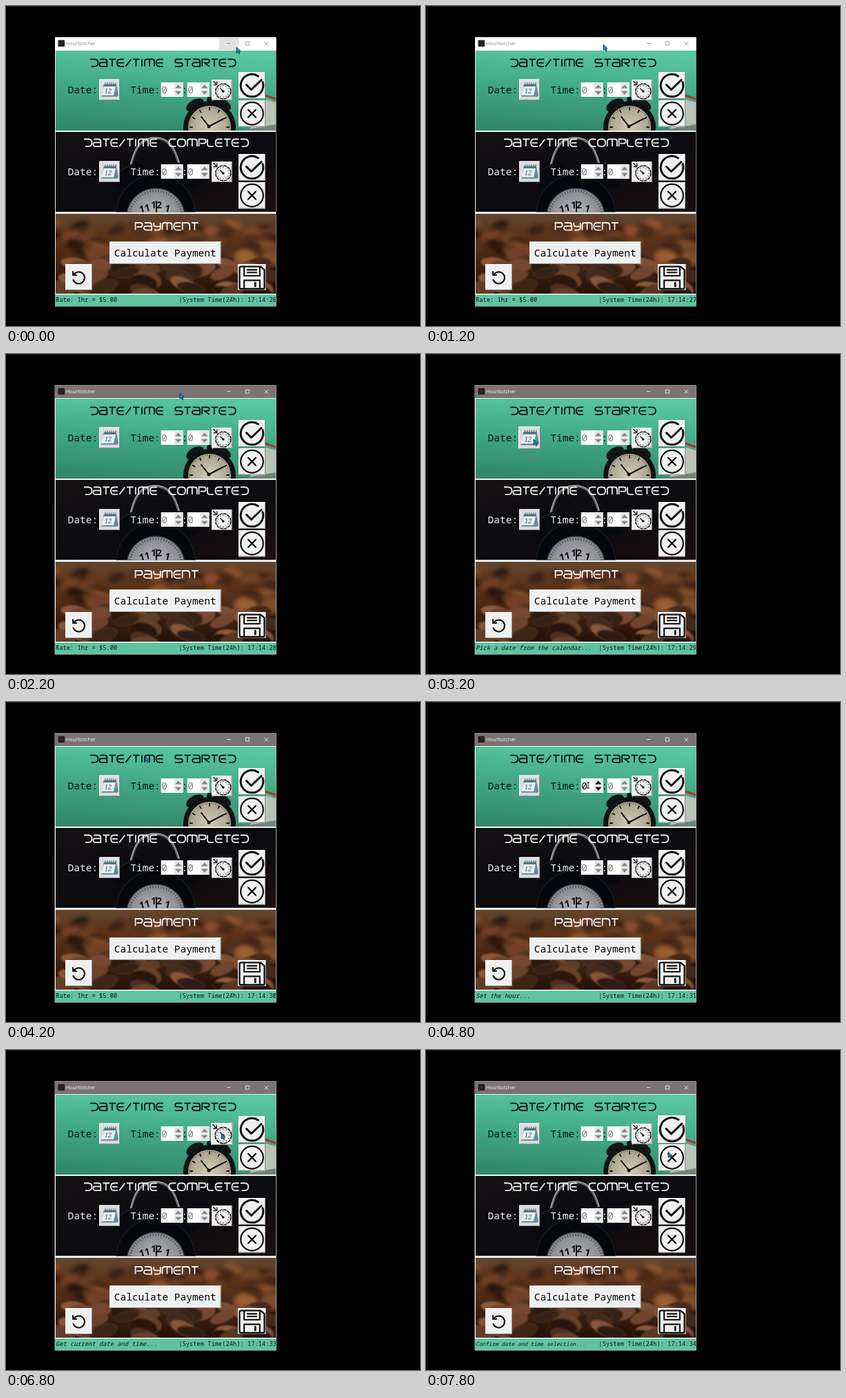
These frames come from a looping animation (600x465 px, 8000 ms). An HTML page:

```html
<!DOCTYPE html>
<html lang="en">
<head>
<meta charset="utf-8">
<title>HourNotcher</title>
<style>
html, body { margin: 0; width: 100%; height: 100%; overflow: hidden; background: #000; }
svg { display: block; }
text { white-space: pre; }
.mono { font: 14.5px "Noto Sans Mono", "DejaVu Sans Mono", monospace; }
.small { font: 500 8.75px "Noto Sans Mono", "DejaVu Sans Mono", monospace; }
.ui { font: 7px "Open Sans", sans-serif; }
.face { font-family: "Noto Serif", serif; text-anchor: middle; }
.dial { font: 700 14px "Open Sans", sans-serif; text-anchor: middle; }
.line { fill: none; stroke: #111; stroke-linecap: round; stroke-linejoin: round; }
</style>
</head>
<body>
<svg id="stage" width="600" height="465" viewBox="0 0 600 465"></svg>
<script>
const STEP = 200, LOOP = 8000;

// Stroke letters of the wide display face: [advance, path] in a 12-unit cap height
const GLYPHS = {
  D: [14, 'M0 0H7Q13 0 13 6T7 12H2'],
  A: [15, 'M1 0H9Q12.5 0 12.5 4V12H5Q0 12 0 8.7T4 5.5H12'],
  T: [12, 'M0 0H11M5 0V12'],
  E: [13, 'M11.5 0H5Q0 0 0 6T5 12H11.5M2 6H11'],
  '/': [11, 'M0 12L9 0'],
  I: [5, 'M1.5 0V12'],
  M: [18, 'M0 12V4Q0 0 4 0H12Q16 0 16 4V12M8 0V12'],
  ' ': [16, ''],
  S: [14, 'M11.5 0H3Q0 0 0 3T3 6H9Q12 6 12 9T9 12H0'],
  R: [14, 'M0 12V0H9Q12 0 12 3T9 6H4L12 12'],
  C: [13, 'M11.5 0H5Q0 0 0 6T5 12H11.5'],
  O: [15, 'M5 0H8Q13 0 13 6T8 12H5Q0 12 0 6T5 0Z'],
  P: [13, 'M0 12V0H8Q11.5 0 11.5 3.5T8 7H2'],
  L: [12, 'M0 0V8Q0 12 4 12H10'],
  Y: [13, 'M0 0V3Q0 6 4 6H11M11 0V8Q11 12 7 12H1'],
  N: [14, 'M0 12V0H7Q12 0 12 5V12']
};

function heading(label, x, y, color) {
  let at = 0;
  const body = [...label].map(c => {
    const [adv, d] = GLYPHS[c], part = `<path transform="translate(${at})" d="${d}"/>`;
    at += adv + 1.1;
    return part;
  }).join('');
  return `<g role="img" aria-label="${label}" transform="translate(${x} ${y}) scale(.88)"
    fill="none" stroke="${color}" stroke-width="2">${body}</g>`;
}

const rect = (x, y, w, h, fill, more = '') =>
  `<rect x="${x}" y="${y}" width="${w}" height="${h}" fill="${fill}" ${more}/>`;
const path = (d, width = 1, more = '') =>
  `<path class="line" d="${d}" stroke-width="${width}" ${more}/>`;
const circle = (x, y, r, fill, more = '') =>
  `<circle cx="${x}" cy="${y}" r="${r}" fill="${fill}" ${more}/>`;
const ellipse = (x, y, rx, ry, fill, turn = 0, more = '') =>
  `<ellipse cx="${x}" cy="${y}" rx="${rx}" ry="${ry}" fill="${fill}" transform="rotate(${turn} ${x} ${y})" ${more}/>`;
const text = (x, y, str, cls, fill, more = '') =>
  `<text x="${x}" y="${y}" class="${cls}" fill="${fill}" ${more}>${str}</text>`;
const panel = (y, h, body) =>
  `<svg x="72" y="${y}" width="319" height="${h}" viewBox="72 ${y} 319 ${h}">${body}</svg>`;

// Raised button around its centre; hovering grows it by 2px
function button(x, y, w, h, icon, id = '', fill = '#f0f0f0') {
  const place = `translate(${x + w / 2} ${y + h / 2})`, r = w / 2 - .5, b = h / 2 - .5;
  return `<g transform="${place}"><g ${id && `id="${id}" data-grow="${1 + 2 / w}"`}>` +
    rect(-w / 2, -h / 2, w, h, fill) +
    path(`M${-r} ${b}V${-b}H${r}`, 1, 'style="stroke:#fff"') +
    path(`M${-r} ${b}H${r}V${-b}`, 1, 'style="stroke:#8c8c8c"') + icon + '</g></g>';
}

function ticks(n, r1, r2, width) {
  let d = '';
  for (let i = 0; i < n; i++) {
    const a = i / n * 2 * Math.PI, c = Math.cos(a), s = Math.sin(a);
    d += `M${c * r1} ${s * r1}L${c * r2} ${s * r2}`;
  }
  return path(d, width);
}

const ICONS = {
  calendar:
    '<path d="M-8-7H10L13 8L11 10H-12Z" fill="#5d8f9b"/><path d="M-8-5H9L6 8H-12Z" fill="#e9f0f2"/>' +
    '<path d="M-8-8H10L9-5H-9Z" fill="#4b7883"/>' +
    path('M-6-10V-7M-3-10V-7M0-10V-7M3-10V-7M6-10V-7M9-10V-7', 1, 'style="stroke:#3c5e68"') +
    text(-2, 5.5, '12', 'face', '#4a5a60', 'font-size="9.5" font-style="italic"'),
  watch:
    '<g transform="translate(2 2)">' + circle(0, 0, 11, 'none', 'stroke="#111" stroke-width="1.5" stroke-dasharray="4.8 .96"') +
    ticks(12, 8, 9.2, .8) + circle(0, 0, 1.8, '#111') + path('M0 0L-4-4', 1.3) + '</g>' +
    path('M-12-12.5L-7-7.5M-7-12V-7.5H-11.5', 1.3),
  check: path('M15.5-5A16.3 16.3 0 1 1 9-13.6M-8-1L-1 6L13.5-8', 3),
  cross: circle(0, 0, 16.3, 'none', 'stroke="#111" stroke-width="2.2"') + path('M-5.5-5.5L5.5 5.5M5.5-5.5L-5.5 5.5', 2.3),
  reset: path('M-7-4A8.5 8.5 0 1 1-8 4', 2.1) + path('M-8.5-8V-3H-3.5', 2.1),
  save: '<g transform="translate(0 .8) scale(.95)">' +
    path('M-16-17H13L19-12V15Q19 17 17 17H-17Q-19 17-19 15V-15Q-19-17-16-17Z', 2.5) +
    path('M-12-16V-3H12V-16M-12 16V4H12V16M-7-12H7M-7-8H7', 2.2) + path('M5 8V13', 3) + '</g>'
};

function spin(x, y, id = '') {
  return `<g ${id && `id="${id}"`} fill="#858585">` + rect(x, y, 32, 21, '#fff') +
    rect(x + 19, y + 1, 12, 9.3, '#e6e6e6') + rect(x + 19, y + 10.8, 12, 9.3, '#e6e6e6') +
    `<text x="${x + .6}" y="${y + 15.7}" class="mono">0</text>
     <path d="M${x + 20.3} ${y + 8.5}h9.4l-4.7-5zM${x + 20.3} ${y + 12.8}h9.4l-4.7 5z"/></g>`;
}

function controls(y, color, ids = []) {
  return text(89.6, y + 62, 'Date:', 'mono', color) + text(180.3, y + 62, 'Time:', 'mono', color) +
    text(254.6, y + 62, ':', 'mono', color) +
    spin(224.7, y + 46, ids[1]) + spin(262.7, y + 46, ids[2]) +
    button(135, y + 41.5, 30, 30.5, ICONS.calendar, ids[0], '#dcdcdc') +
    button(298, y + 42, 29.5, 30, ICONS.watch, ids[3]) +
    button(337, y + 31, 39, 39, ICONS.check, ids[4]) +
    button(337, y + 72, 39, 38.5, ICONS.cross);
}

const greenScene = rect(72, 65, 319, 116, 'url(#green)') +
  '<path d="M352 181L377 136L391 140V181Z" fill="#b9c1b8"/><path d="M340 181L391 172V181Z" fill="#6f8478"/>' +
  path('M372 128.5L392 135.5', 3, 'style="stroke:#b5312b"') +
  ellipse(274, 144, 14, 8, '#131517', -30) + ellipse(313, 143, 14, 8, '#131517', 28) +
  circle(295, 136, 4, '#131517') + circle(295, 176, 38, '#0f1213') +
  circle(295, 176, 31, 'url(#cream)') +
  `<g transform="translate(295 176)">${ticks(12, 25, 28, 1.8)}${ticks(60, 28.5, 29.5, .5)}</g>` +
  path('M294 175L283 161M294 175L315 164', 2) + circle(294, 175, 2.5, '#111');

const darkScene = rect(72, 183, 319, 116, 'url(#dark)') +
  path('M180 236C186 206 196 192 216 192S244 206 251 230', 3.4, 'style="stroke:#6d6c70"') +
  path('M180 233C186 204 196 191 216 191S244 204 251 227', 1, 'style="stroke:#b9b8ba"') +
  ellipse(179, 247, 27, 15, '#07090e', -28) + ellipse(257, 246, 27, 15, '#07090e', 28) +
  path('M160 246Q171 232 187 231M247 231Q265 234 275 246', 1.2, 'style="stroke:#1f2731"') +
  circle(217, 302, 57, '#05070b', 'stroke="#141b25" stroke-width="1.5"') +
  circle(217, 307, 42, 'url(#steel)', 'stroke="#3b4049" stroke-width="1.5"') +
  `<g transform="translate(217 307)">${ticks(60, 37, 39.5, .7)}</g>` +
  text(218, 294, '12', 'dial', '#14161b') +
  text(202, 299, '11', 'dial', '#14161b', 'transform="rotate(-14 202 299)"') +
  text(233, 299, '1', 'dial', '#14161b', 'transform="rotate(14 233 299)"') +
  path('M218 300V284', 2);

// Out-of-focus blobs behind, then sharper coins towards the bottom
function coinScene() {
  let seed = 17, out = rect(72, 302, 319, 116, 'url(#brown)');
  const rnd = () => (seed = seed * 16807 % 2147483647) / 2147483647;
  for (let i = 0; i < 105; i++) {
    const k = i / 105, far = k < .5, x = 66 + rnd() * 330, y = 312 + k * 104 + rnd() * 8, r = 13 + k * 9;
    const tone = `${18 + rnd() * 9} ${far ? 50 : 42}%`, light = 8 + rnd() * 32;
    out += ellipse(x, y, r, r * (.35 + rnd() * .25), `hsl(${tone} ${light}%)`, rnd() * 50 - 25,
      `stroke="hsl(${tone} ${light * .6 + 14}%)" filter="url(#${far ? 'far' : 'near'})"`);
  }
  return out;
}

const stop = (at, color) => `<stop offset="${at}" stop-color="${color}"/>`;
const stage = document.getElementById('stage');
stage.innerHTML = `<defs>
  <linearGradient id="green" x1=".6" x2=".4" y2="1">${stop(0, '#59c7a2') + stop(.45, '#43ab89') + stop(1, '#31896a')}</linearGradient>
  <radialGradient id="cream">${stop(0, '#d2cab4') + stop(1, '#a8a18c')}</radialGradient>
  <radialGradient id="steel">${stop(0, '#c0c0c4') + stop(1, '#84858c')}</radialGradient>
  <linearGradient id="dark" y2="1">${stop(0, '#141113') + stop(.5, '#0c0b0f') + stop(1, '#180f0f')}</linearGradient>
  <linearGradient id="brown" x2="0" y2="1">${stop(0, '#62462f') + stop(.3, '#5d3319') + stop(1, '#231108')}</linearGradient>
  <filter id="far" x="-60%" y="-120%" width="220%" height="340%"><feGaussianBlur stdDeviation="3.4"/></filter>
  <filter id="near"><feGaussianBlur stdDeviation=".8"/></filter>
  </defs>` +
  rect(0, 0, 600, 1, '#202020') +
  rect(70, 45, 322, 391.5, '#5c5757', 'id="frame"') + rect(71, 45.5, 320.5, 391, '#f0f0f0') +
  rect(71, 45.5, 320.5, 18.5, '#fff', 'id="bar"') +
  rect(309, 45.5, 28, 18.5, '#e0e0e0', 'id="minHover"') +
  rect(75.5, 49.5, 9.5, 9.5, '#2b2020') + text(87, 57, 'HourNotcher', 'ui', '#888', 'id="caption"') +
  '<path id="winButtons" fill="none" stroke-width=".8" d="M320 54.5h5.5M347.3 52h5v5h-5zM374.5 52l5.5 5.5m0-5.5l-5.5 5.5"/>' +
  panel(65, 116, greenScene) + panel(183, 116.5, darkScene) + panel(302, 116, coinScene()) +
  heading('DATE/TIME STARTED', 122, 77.3, '#06110d') +
  controls(65, '#07120f', ['calendar', 'hour', 'minute', 'watch', 'check']) +
  heading('DATE/TIME COMPLETED', 113, 193.5, '#eee') +
  controls(184, '#f0f0f0') +
  heading('PAYMENT', 187.5, 315, '#f0f0f0') +
  button(150, 342.5, 161.5, 32.5, text(0, 5.3, 'Calculate Payment', 'mono', '#000', 'text-anchor="middle"')) +
  button(86, 375, 39, 38, ICONS.reset) + button(336, 375, 41, 38, ICONS.save) +
  rect(71, 419.5, 320.5, 16.5, '#5fc3a2') +
  panel(419.5, 16.5, text(72, 430.2, '', 'small', '#06130f', 'id="status"') +
    text(250.3, 430.2, '', 'small', '#06130f', 'id="clock"')) +
  `<g id="pointer"><path id="arrow" d="M0 0V8.4L2 6.6L3.5 9.6L5 8.9L3.7 6L6 5.7Z" fill="#1d86c4" stroke="#0b3550" stroke-width=".8"/>
   <path id="beam" d="M-2-4H2M0-4V4M-2 4H2" fill="none" stroke="#111"/></g>`;

const $ = id => document.getElementById(id);

// Pointer stops: time, x, y
const TRACK = [
  [0, 334, 60], [200, 274, 54], [600, 274, 54], [1200, 257, 56], [1400, 257, 56],
  [1600, 253, 57], [2200, 252, 57], [2600, 205, 80], [3000, 161, 119], [3200, 156, 124],
  [3400, 156, 124], [4000, 186, 64], [4600, 233, 108], [4800, 235, 121], [5000, 235, 121],
  [5400, 269, 122], [5800, 273, 122], [6200, 304, 131], [6400, 308, 122], [6600, 308, 122],
  [6800, 312, 121], [7200, 353, 117], [7800, 351, 148]
];

// Hovered control with its hint: start, end, id, hint
const HOVERS = [
  [3000, 3600, 'calendar', 'Pick a date from the calendar...'],
  [4800, 5400, 'hour', 'Set the hour...'],
  [5400, 6000, 'minute', 'Set the minute...'],
  [6200, 7000, 'watch', 'Get current date and time...'],
  [7200, LOOP, 'check', 'Confirm date and time selection...']
];

function pointerAt(t) {
  const i = TRACK.findIndex(p => p[0] > t);
  if (i < 0) return TRACK[TRACK.length - 1].slice(1);
  const [t0, x0, y0] = TRACK[i - 1], [t1, x1, y1] = TRACK[i], k = (t - t0) / (t1 - t0);
  return [x0 + (x1 - x0) * k, y0 + (y1 - y0) * k];
}

const show = (id, on) => $(id).setAttribute('visibility', on ? 'visible' : 'hidden');

function draw(t) {
  const active = t >= 1800;
  $('bar').setAttribute('fill', active ? '#7b7373' : '#fff');
  $('caption').setAttribute('fill', active ? '#fff' : '#888');
  $('winButtons').setAttribute('stroke', active ? '#fff' : '#888');
  show('frame', active);
  show('minHover', t < 200);

  let hint = '', over = '';
  for (const [start, end, id, label] of HOVERS) {
    const on = t >= start && t < end, el = $(id), grow = el.dataset.grow;
    if (on) { hint = label; over = id; }
    if (grow) el.setAttribute('transform', `scale(${on ? grow : 1})`);
    else el.setAttribute('fill', on ? '#000' : '#858585');
  }
  const status = $('status');
  status.textContent = hint || 'Rate: 1hr = $5.00';
  status.style.fontStyle = hint ? 'italic' : 'normal';
  status.style.fontSize = over === 'check' ? '7.8px' : '8.75px';
  $('clock').textContent = '|System Time(24h): 17:14:' + (26 + Math.floor((t + 200) / 1000));

  const typing = over === 'hour' || over === 'minute';
  show('arrow', !typing);
  show('beam', typing);
  $('pointer').setAttribute('transform', `translate(${pointerAt(t)})`);
}

const begin = performance.now();
function frame() {
  const t = (performance.now() - begin) % LOOP;
  draw(Math.floor(t / STEP) * STEP);
  requestAnimationFrame(frame);
}
frame();
</script>
</body>
</html>
```
